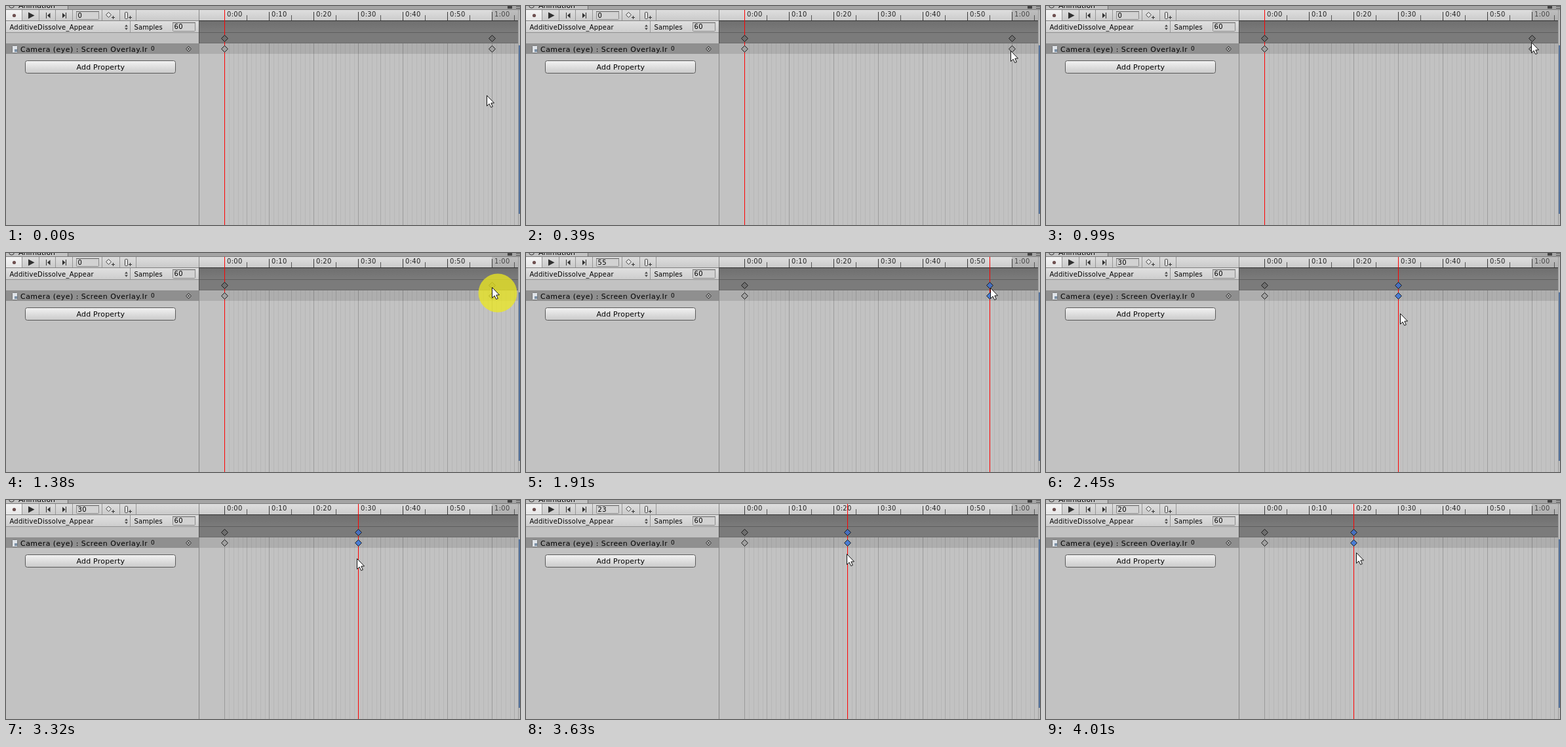
An HTML page with a canvas that plays this animation: 784 by 334 pixels, repeating every 4090 ms.

```html
<!DOCTYPE html>
<html lang="en">
<head>
<meta charset="utf-8">
<title>Keyframe timeline</title>
<style>
html, body { margin: 0; width: 100%; height: 100%; overflow: hidden; background: #c2c2c2; }
canvas { display: block; }
</style>
</head>
<body>
<canvas id="stage" width="784" height="334"></canvas>
<script>
const W = 784, H = 334, LOOP = 4090;
const ZERO = 333.4, STEP = 6.8, DIVIDER = 294, EDGE = 781;
const stage = document.getElementById('stage').getContext('2d');
const base = document.createElement('canvas');
base.width = W;
base.height = H;
let c = base.getContext('2d');

const frameX = f => Math.round(ZERO + f * STEP);

function rect(x, y, w, h, fill) {
  c.fillStyle = fill;
  c.fillRect(x, y, w, h);
}

function shade(x, y, w, h, top, bottom) {
  const g = c.createLinearGradient(0, y, 0, y + h);
  g.addColorStop(0, top);
  g.addColorStop(1, bottom);
  rect(x, y, w, h, g);
}

function text(s, x, y, size = 10, gap = 0, fill = '#000') {
  c.font = size + 'px "DejaVu Sans", Verdana, sans-serif';
  c.letterSpacing = gap + 'px';
  c.fillStyle = fill;
  c.fillText(s, x, y);
}

function poly(points, fill, line) {
  c.beginPath();
  points.forEach(([x, y]) => c.lineTo(x, y));
  c.closePath();
  if (fill) { c.fillStyle = fill; c.fill(); }
  if (line) { c.strokeStyle = line; c.lineWidth = 1; c.stroke(); }
}

function diamond(x, y, r, fill, line) {
  poly([[x, y - r], [x + r, y], [x, y + r], [x - r, y]], fill, line);
}

function disc(x, y, r, fill) {
  c.beginPath();
  c.arc(x, y, r, 0, Math.PI * 2);
  c.fillStyle = fill;
  c.fill();
}

function box(x, y, w, h, radius, fill, line) {
  c.beginPath();
  c.roundRect(x + 0.5, y + 0.5, w - 1, h - 1, radius);
  c.fillStyle = fill;
  c.fill();
  c.strokeStyle = line;
  c.lineWidth = 1;
  c.stroke();
}

function field(x, y, w, h) {
  box(x, y, w, h, 1, '#d2d2d2', '#8a8a8a');
  rect(x, y, w, 1, '#5c5c5c');
}

function plus(x, y) {
  rect(x - 2, y, 5, 1, '#333');
  rect(x, y - 2, 1, 5, '#333');
}

function drawTabs() {
  rect(0, 0, W, 5, '#a4a4a4');
  rect(0, 0, 94, 5, '#c2c2c2');
  rect(94, 0, 1, 5, '#707070');
  c.strokeStyle = '#333';
  c.beginPath();
  c.arc(8.5, -1, 4, 0, Math.PI * 2);
  c.stroke();
  text('Animation', 19, 3, 11);
  rect(765, 0, 7, 4, '#444');
  rect(778, 0, 6, 1, '#555');
  rect(778, 3, 6, 1, '#555');
  rect(0, 5, W, 1, '#7c7c7c');
}

function drawToolbar() {
  shade(0, 6, DIVIDER, 16, '#dedede', '#cacaca');
  shade(0, 6, 24, 16, '#f4f4f4', '#e6e6e6');
  [24, 50, 75, 101, 146, 173, 198].forEach(x => rect(x, 6, 1, 16, '#969696'));
  disc(12.5, 14.5, 2.6, '#6e5050');
  poly([[34, 9.5], [43.5, 14.5], [34, 19.5]], '#303030');
  rect(61, 10, 1, 9, '#303030');
  poly([[67.5, 10.5], [63, 14.5], [67.5, 18.5]], '#303030');
  poly([[86, 10.5], [90.5, 14.5], [86, 18.5]], '#303030');
  rect(91, 10, 1, 9, '#303030');
  field(107, 8, 35, 13);
  diamond(156.5, 13.5, 4, '#e4e4e4', '#444');
  plus(163, 17);
  box(181, 9, 5, 11, 1, '#e4e4e4', '#444');
  plus(189, 17);
  rect(0, 22, DIVIDER, 1, '#828282');
}

function drawRows() {
  shade(0, 23, DIVIDER, 17, '#e0e0e0', '#cecece');
  rect(0, 40, DIVIDER, 1, '#909090');
  rect(189, 23, 1, 17, '#969696');
  text('AdditiveDissolve_Appear', 5.5, 36, 10, 0.2);
  poly([[181, 31.5], [183.5, 28.5], [186, 31.5]], '#444');
  poly([[181, 33.5], [183.5, 36.5], [186, 33.5]], '#444');
  text('Samples', 195.5, 36, 10, 0.1);
  field(254, 25, 35, 14);
  text('60', 256.5, 35, 10, 0.4);

  rect(0, 57, DIVIDER, 16, '#8f8f8f');
  box(9, 60, 9, 12, 1, '#dfe3e8', '#777');
  rect(13, 66, 4, 4, '#7d92a8');
  c.save();
  c.beginPath();
  c.rect(20, 57, 195.5, 16);
  c.clip();
  text('Camera (eye) : Screen Overlay.In', 22, 70, 11, 0.45);
  c.restore();
  text('0', 221, 67.5, 9);
  diamond(278.5, 65.5, 4, '#b4b4b4', '#222');
  rect(277.5, 64.5, 2, 2, '#222');

  const g = c.createLinearGradient(0, 83, 0, 103);
  g.addColorStop(0, '#f4f4f4');
  g.addColorStop(1, '#c9c9c9');
  box(29, 83, 230, 20, 3, g, '#5a5a5a');
  text('Add Property', 107.5, 97, 11, 0.2);
}

function drawTimeline() {
  const w = EDGE - DIVIDER, end = frameX(60);
  shade(DIVIDER, 6, w, 16, '#dedede', '#cccccc');
  shade(end, 6, EDGE - end, 16, '#bebebe', '#b0b0b0');
  shade(DIVIDER, 23, w, 17, '#6f6f6f', '#7b7b7b');
  rect(DIVIDER, 40, w, 1, '#5e5e5e');
  rect(DIVIDER, 41, w, 15, '#7b7b7b');
  rect(DIVIDER, 56, w, 1, '#6a6a6a');
  rect(DIVIDER, 57, w, 16, '#aeaeae');
  rect(DIVIDER, 22, w, 1, '#303030');

  for (let f = 0; f <= 65; f++) {
    const x = frameX(f);
    const major = f % 10 === 0, minor = f % 5 === 0;
    rect(x, 57, 1, H - 57, `rgba(0,0,0,${major ? 0.2 : minor ? 0.13 : 0.055})`);
    if (major) {
      const label = f === 60 ? '1:00' : '0:' + String(f).padStart(2, '0');
      rect(x, 9, 1, 13, '#3a3a3a');
      text(label, x + 4, 16, 10, 0.3, f === 60 ? '#444' : '#222');
    } else if (minor) {
      rect(x, 14, 1, 8, '#555');
    }
  }
  rect(DIVIDER, 6, 1, H - 6, '#868686');
  rect(DIVIDER, 22, 1, 35, '#505050');
  rect(EDGE, 6, 3, H - 6, '#bcbcbc');
  rect(EDGE, 6, 1, H - 6, '#a0a0a0');
  rect(782, 60, 2, 257, '#54729c');
}

function drawBase() {
  rect(0, 0, W, H, '#c2c2c2');
  drawTabs();
  drawToolbar();
  drawRows();
  drawTimeline();
}

// Pointer strokes: evenly timed poses between start and end
const strokes = [
  { start: 80, end: 540,
    x: [733, 734, 736, 738, 739, 740, 740],
    y: [133, 122, 104, 84, 68, 59, 55] },
  { start: 990, end: 1150,
    x: [740, 740, 741],
    y: [55, 53, 52] },
  { start: 1600, end: 2450,
    x: [740, 736, 729, 720, 708, 675, 632, 600, 575, 556, 545, 540],
    y: [52, 52, 52, 53, 53, 58, 66, 74, 81, 87, 90, 92] },
  { start: 3250, end: 4010,
    x: [539, 535, 526, 514, 501, 489, 485, 481, 477, 474, 473],
    y: [91, 89, 87, 85, 83, 82, 82, 81, 81, 80, 80] }
];

function pointerAt(t) {
  let pos = { x: 733, y: 136 };
  for (const s of strokes) {
    if (t < s.start) break;
    const last = s.x.length - 1;
    const i = Math.min(last, Math.floor((t - s.start) / (s.end - s.start) * last + 0.07));
    pos = { x: s.x[i], y: s.y[i] };
  }
  return pos;
}

function drawKeys(f, selected) {
  const x = frameX(f) + 0.5;
  diamond(x, 49.5, 5, selected ? '#476fbd' : '#6e6e6e', '#1c1c1c');
  diamond(x, 65.5, 5, selected ? '#4a7cd2' : '#a0a0a0', '#1c1c1c');
}

function drawPointer({ x, y }) {
  const outline = [[0, 0], [0, 16], [3.6, 12.6], [6.2, 18], [8.8, 16.9], [6.3, 11.6], [11, 11.4]];
  poly(outline.map(([dx, dy]) => [x + 0.5 + dx, y + 0.5 + dy]), '#fff', '#111');
}

function draw(t) {
  const pos = pointerAt(t);
  const dragged = t >= 1600;
  const key = dragged ? Math.round((pos.x - 334) / STEP) : 60;
  const head = dragged ? key : 0;
  c.drawImage(base, 0, 0);
  text(String(head), 109.5, 18, 10, 0.4);
  rect(frameX(head), 6, 1, H - 6, '#ff0000');
  drawKeys(0, false);
  drawKeys(key, dragged);
  if (t >= 1380 && t < 1600) disc(750, 61, 29.5, 'rgba(236,232,30,.75)');
  drawPointer(pos);
}

drawBase();
c = stage;
const begin = performance.now();
function tick() {
  draw((performance.now() - begin) % LOOP);
  requestAnimationFrame(tick);
}
tick();
</script>
</body>
</html>
```
